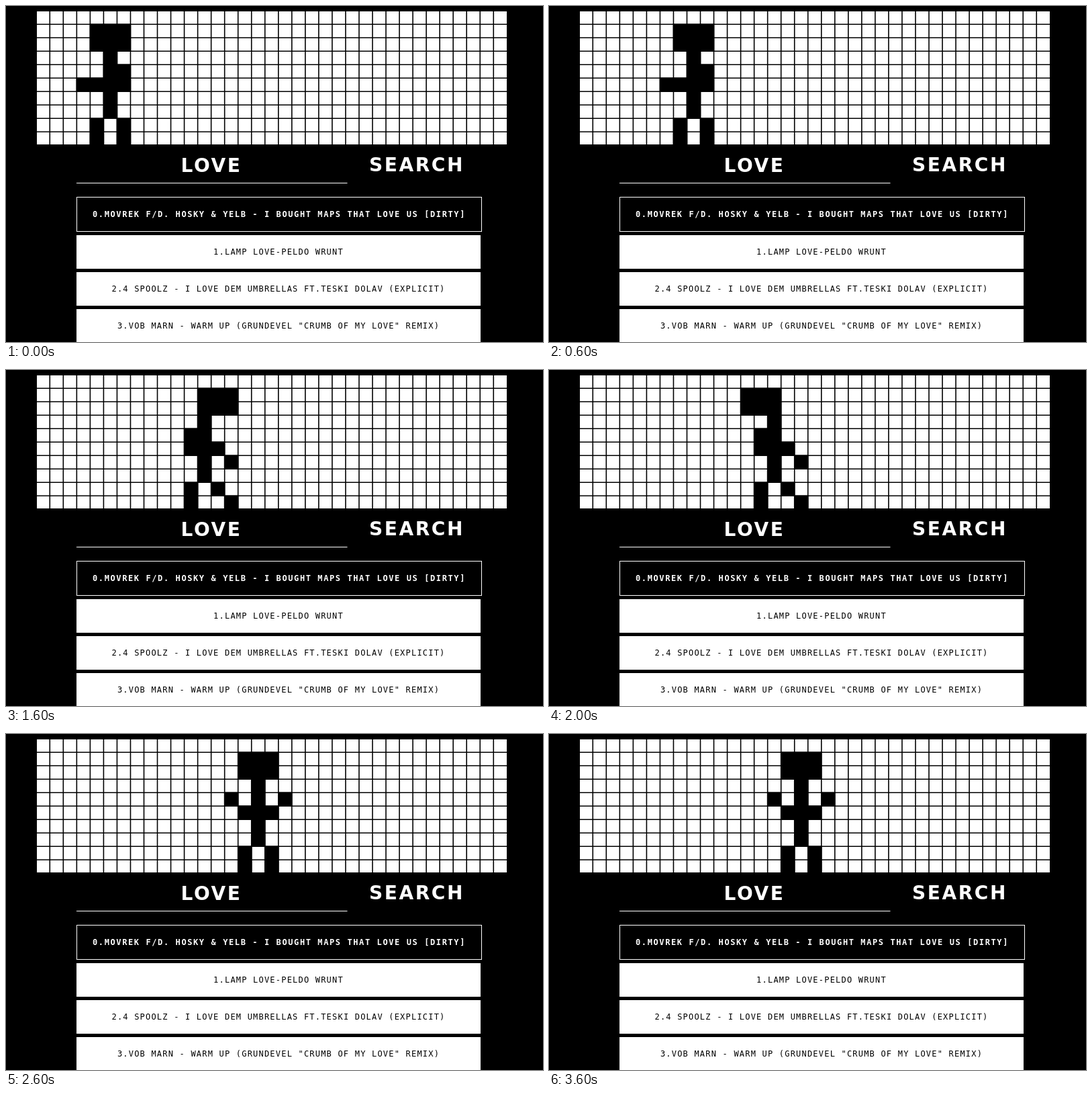
An HTML page for the animation above (3.8 s loop, 800x500 px).

```html
<!DOCTYPE html>
<html lang="en">
<head>
<meta charset="utf-8">
<title>Love search</title>
<style>
  html, body { margin: 0; width: 100%; height: 100%; overflow: hidden; background: #000; }
  svg { display: block; width: 800px; height: 500px; }
  text { text-anchor: middle; fill: #fff; }
  .head { font: bold 28px "DejaVu Sans", sans-serif; letter-spacing: 2.6px; }
  .row { font: 12px "DejaVu Sans Mono", monospace; letter-spacing: 1.2px; fill: #000; }
  .active { font-weight: bold; letter-spacing: 1.6px; fill: #fff; }
</style>
</head>
<body>
<svg viewBox="0 0 800 500">
  <rect width="800" height="500"/>
  <rect x="46" y="8" width="700" height="198" fill="#fff"/>
  <path id="lines" stroke="#000" stroke-width="1.6"/>
  <path id="man"/>

  <text class="head" x="306" y="247">LOVE</text>
  <text class="head" x="612" y="246">SEARCH</text>
  <rect x="105" y="263" width="403.5" height="1" fill="#fff"/>

  <rect x="105.5" y="284.5" width="603" height="51" stroke="#fff"/>
  <g fill="#fff">
    <rect x="105" y="341" width="602" height="50"/>
    <rect x="105" y="396" width="602" height="50"/>
    <rect x="105" y="451" width="602" height="50"/>
  </g>
  <text class="row active" x="407" y="314">0.MOVREK F/D. HOSKY &amp; YELB - I BOUGHT MAPS THAT LOVE US [DIRTY]</text>
  <text class="row" x="406" y="370">1.LAMP LOVE-PELDO WRUNT</text>
  <text class="row" x="406" y="425">2.4 SPOOLZ - I LOVE DEM UMBRELLAS FT.TESKI DOLAV (EXPLICIT)</text>
  <text class="row" x="406" y="480">3.VOB MARN - WARM UP (GRUNDEVEL "CRUMB OF MY LOVE" REMIX)</text>
</svg>
<script>
const LEFT = 46, TOP = 8, PITCH_X = 20.03, PITCH_Y = 20, GAP = 1.5;
const COLS = 35, ROWS = 10, STEP = 200, LOOP = 3800;
const $ = id => document.getElementById(id);

// Legs by side (-1 left, 1 right), as [column, row] from the torso
const LEGS = {
  stand: s => [[s, 8], [s, 9]],
  step: s => [[s, 8], [s + 1, 9]],
  kick: s => [[2 * s, 7], [s, 8]]
};

// torso column, left hand, right hand, left leg, right leg, head shift, lift
const idle = [16, [-2, 4], [2, 4], 'stand', 'stand'];
const wait = [11, [-2, 4], [2, 6], 'step', 'step'];
const POSES = [
  [5, [-2, 5], [1, 4], 'stand', 'stand'],
  [6, [-2, 4], [2, 5], 'stand', 'step'],
  [7, [-2, 4], [2, 6], 'step', 'step'],
  [8, [-2, 5], [1, 4], 'stand', 'stand'],
  [9, [-1, 6], [2, 4], 'stand', 'step'],
  [10, [-1, 6], [2, 4], 'stand', 'stand'],
  wait, wait,
  [12, [-1, 4], [2, 6], 'stand', 'step', 1],
  [13, [-2, 4], [2, 4], 'stand', 'stand'],
  [14, [-1, 4], [2, 6], 'stand', 'step', -1],
  [15, [-2, 4], [2, 4], 'stand', 'stand'],
  [16, [-2, 4], [2, 4], 'stand', 'stand', 0, 1],
  idle, idle,
  [16, [-2, 4], [1, 4], 'kick', 'stand'],
  idle,
  [16, [-1, 4], [2, 4], 'stand', 'kick'],
  idle
];

function block(col, row, w = 1, h = 1) {
  const x = LEFT + col * PITCH_X - GAP, y = TOP + row * PITCH_Y - GAP;
  return `M${x} ${y}h${w * PITCH_X + GAP}v${h * PITCH_Y + GAP}H${x}z`;
}

function figure([col, left, right, legL, legR, head = 0, lift = 0]) {
  const limbs = [left, right, ...LEGS[legL](-1), ...LEGS[legR](1)];
  return block(col + head - 1, 1 - lift, 3, 2)
    + block(col, 3 - lift, 1, 5)
    + block(col - 1, 5 - lift, 3)
    + limbs.map(([x, y]) => block(col + x, y - lift)).join('');
}

let grid = '';
for (let c = 1; c < COLS; c++) grid += `M${LEFT + c * PITCH_X - GAP / 2} ${TOP}v198`;
for (let r = 1; r < ROWS; r++) grid += `M${LEFT} ${TOP + r * PITCH_Y - GAP / 2}h700`;
$('lines').setAttribute('d', grid);

const paths = POSES.map(figure);
const start = performance.now();
let shown = -1;
function draw() {
  const i = Math.floor((performance.now() - start) % LOOP / STEP);
  if (i !== shown) $('man').setAttribute('d', paths[shown = i]);
  requestAnimationFrame(draw);
}
draw();
</script>
</body>
</html>
```
